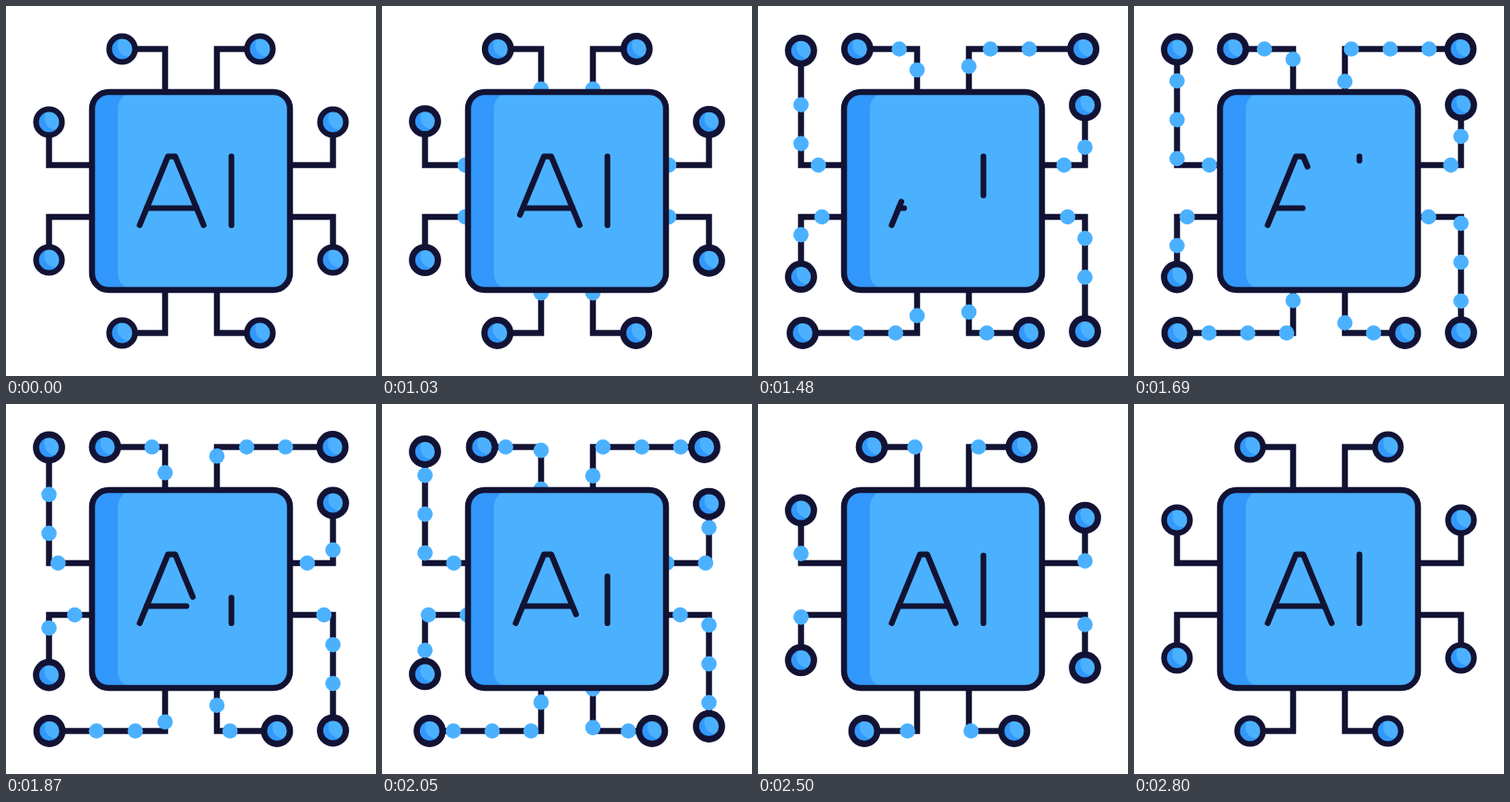
Animation of 400x400 px, one loop 2830 ms. Source, as an HTML page with a canvas:

```html
<!DOCTYPE html>
<html lang="en">
<head>
<meta charset="utf-8">
<title>AI chip</title>
<style>
  html, body { margin: 0; width: 100%; height: 100%; overflow: hidden; background: #fff; }
  canvas { display: block; width: 400px; height: 400px; }
</style>
</head>
<body>
<canvas aria-label="AI chip"></canvas>
<script>
const LOOP = 2830, START = 1000, STEP = 30, END = 1800;
const INK = '#121334', LIGHT = '#4bb1ff', DARK = '#3298fc';
const GAP = 42, RISE = 43.5, REST = 74.5;

const canvas = document.querySelector('canvas');
const ctx = canvas.getContext('2d');
const ratio = window.devicePixelRatio || 1;
canvas.width = canvas.height = 400 * ratio;

const clamp = x => Math.min(1, Math.max(0, x));
const span = (t, from, to) => clamp((t - from) / (to - from));
const smooth = x => x * x * (3 - 2 * x);
const easeOut = x => 1 - (1 - x) ** 3;

function disc(x, y, r, color) {
  ctx.beginPath();
  ctx.arc(x, y, r, 0, Math.PI * 2);
  ctx.fillStyle = color;
  ctx.fill();
}

function polyline(points, width, cap) {
  ctx.beginPath();
  points.forEach(p => ctx.lineTo(...p));
  ctx.lineWidth = width;
  ctx.lineCap = cap;
  ctx.strokeStyle = INK;
  ctx.stroke();
}

// Erases a stroke from its start, then draws it again.
function letterStroke(points, t, delay) {
  const u = t - delay;
  const from = u < 415 ? clamp(u / 415) : 0;
  const to = u < 415 ? 1 : easeOut(span(u, 420, 1460));
  if (to - from < 0.002) return;
  let length = 0;
  for (let i = 1; i < points.length; i++) {
    length += Math.hypot(points[i][0] - points[i - 1][0], points[i][1] - points[i - 1][1]);
  }
  ctx.setLineDash(to - from < 1 ? [(to - from) * length, 999] : []);
  ctx.lineDashOffset = -from * length;
  polyline(points, 6.2, 'round');
  ctx.setLineDash([]);
}

function node(x, y, moving) {
  ctx.save();
  ctx.translate(x, y);
  disc(0, 0, 14, DARK);
  ctx.clip();
  disc(7, -4, 12, LIGHT);
  ctx.restore();
  ctx.beginPath();
  ctx.arc(x, y, 14, 0, Math.PI * 2);
  ctx.lineWidth = moving ? 6.8 : 6.2;
  ctx.strokeStyle = INK;
  ctx.stroke();
}

// One wire with its dots and node; side 1 is the long one, -1 the short one.
function wire(turn, side, t) {
  const moving = t > 0 && t < END;
  const stretch = smooth(span(t, 0, 520)) - smooth(span(t, 945, 1665));
  const reach = REST + stretch * (side > 0 ? 78.5 : 18.5);
  const length = RISE + reach - 28;

  ctx.save();
  ctx.translate(200, 200);
  ctx.rotate(turn * Math.PI / 2);
  ctx.scale(side, 1);
  polyline([[28, -105], [28, -153.5], [reach, -153.5]], 6.5, 'butt');
  if (moving) {
    const lead = length * smooth(span(t, 0, 690));
    const tail = smooth(span(t, 1200, END)) * (length + 4) - 4;
    const phase = (4.6 - 0.14 * t + GAP * 10) % GAP;
    for (let d = lead - phase; d >= tail; d -= GAP) {
      disc(28 + Math.max(0, d - RISE), -110 - Math.min(d, RISE), 8.3, LIGHT);
    }
  }
  ctx.restore();

  let x = side * reach, y = -153.5;
  for (let i = 0; i < turn; i++) [x, y] = [-y, x];
  node(200 + x, 200 + y, moving);
}

function chip() {
  const box = (x, w, r) => {
    ctx.beginPath();
    ctx.roundRect(x, 93, w, 214, r);
  };
  box(93, 214, 18);
  ctx.fillStyle = DARK;
  ctx.fill();
  box(121, 186, 18);
  ctx.fillStyle = LIGHT;
  ctx.fill();
  box(93, 214, 18);
  ctx.lineWidth = 6.5;
  ctx.strokeStyle = INK;
  ctx.stroke();
}

function draw() {
  const t = Math.max(0, Math.floor((performance.now() % LOOP - START) / STEP) * STEP);
  ctx.setTransform(ratio, 0, 0, ratio, 0, 0);
  ctx.lineJoin = 'miter';
  ctx.clearRect(0, 0, 400, 400);
  for (let turn = 0; turn < 4; turn++) {
    wire(turn, 1, t);
    wire(turn, -1, t);
  }
  chip();
  ctx.lineJoin = 'round';
  const u = t < END ? t : 0;
  letterStroke([[144.5, 237], [175, 162.7], [183, 162.7], [213.7, 237]], u, 0);
  letterStroke([[152, 218.5], [206, 218.5]], u, 20);
  letterStroke([[243.7, 237], [243.7, 162.7]], u, 300);
  requestAnimationFrame(draw);
}
draw();
</script>
</body>
</html>
```
